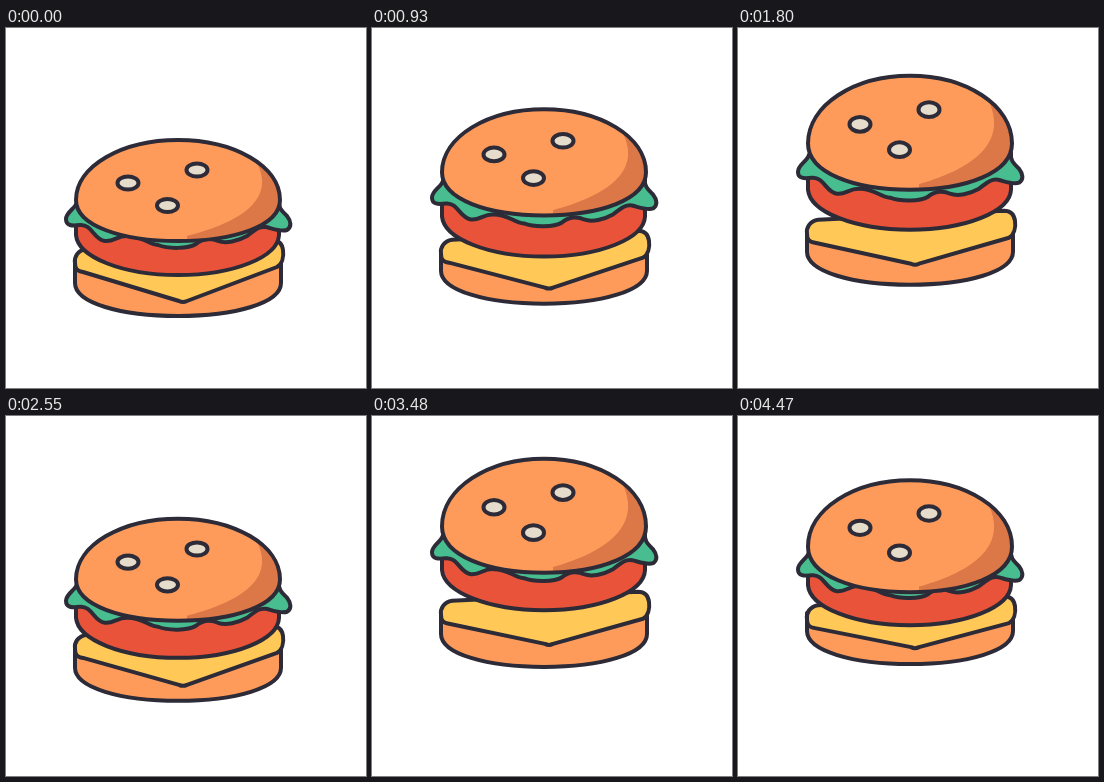
These frames come from a looping animation (360 by 360 pixels, 4500 ms). An HTML page:

```html
<!DOCTYPE html>
<html lang="en">
<head>
<meta charset="utf-8">
<title>Bouncing burger</title>
<style>
html, body { margin: 0; width: 100%; height: 100%; overflow: hidden; background: #fff; }
svg { display: block; width: 100%; height: 100%; }
.line { stroke: #2d2b38; stroke-width: 4; stroke-linejoin: round; stroke-linecap: round; }
#bun * { vector-effect: non-scaling-stroke; }
</style>
</head>
<body>
<svg viewBox="0 0 360 360">
  <path id="base" class="line" fill="#fe9b5b" d="M69 237V255C69 275 115 288 172 288S275 275 275 255V232Z"/>
  <path id="cheese" class="line" fill="#ffc857"/>
  <path id="patty" class="line" fill="#e9533a" d="M70 185V207C72 229 116 247 172 247S272 229 273 207V185Z"/>
  <path id="lettuce" class="line" fill="#48bd90" d="M71 174C70 180 60 184 60 191C60 198 66 198 74 197C86 196 88 212 99 213C108 214 112 207 122 208C136 208 142 216 152 217C162 221 182 221 190 216C197 210 206 210 212 213C220 216 232 213 241 208C248 203 252 198 260 199C268 201 275 204 281 202C286 199 285 193 281 188C276 183 272 180 273 172Z"/>
  <g id="bun">
    <path fill="#fe9b5b" d="M70 172C70 138 116 112 172 112S274 138 274 172C274 198 228 213 172 213S70 198 70 172Z"/>
    <path fill="#dc7748" d="M252 137C266 146 274 158 274 172C274 197 232 213 181 213V208C220 198 271 178 252 137Z"/>
    <path class="line" fill="none" d="M70 172C70 138 116 112 172 112S274 138 274 172C274 198 228 213 172 213S70 198 70 172Z"/>
    <g class="line" fill="#e6dccb">
      <ellipse cx="122" cy="155" rx="10.5" ry="6.5"/>
      <ellipse cx="191" cy="142" rx="10.5" ry="6.5"/>
      <ellipse cx="161.5" cy="177.5" rx="10.5" ry="6.5"/>
    </g>
  </g>
</svg>
<script>
const LOOP = 4500, PERIOD = 825, START = 35;

// Height of each part above its resting place, at these moments of one hop
const times = [0, 40, 70, 115, 160, 220, 310, 412, 505, 550, 620];
const lift = {
  bunTop:    [0, 9, 30, 64, 70, 62, 48, 26, 9, 0, 0],
  bunBottom: [0, 8, 25, 51, 57, 52, 37, 20, 6, 0, 0],
  lettuce:   [0, 6, 21, 47, 56, 52, 38, 16, 3, 0, 0],
  patty:     [0, 5, 18, 45, 54, 52, 38, 10, 0, 2, 0],
  cheeseTip: [0, 4, 13, 37, 47, 50, 42, 10, 0, 0, 0],
  cheese:    [0, 2, 9, 29, 38, 41, 32, 8, 0, 0, 0],
  base:      [0, 3, 12, 31, 39, 45, 40, 10, 0, 0, 0]
};

const slope = (v, i) => (v[i + 1] - v[i]) / (times[i + 1] - times[i]) || 0;

// Monotone tangent: flat at extremes, harmonic mean elsewhere
function tangent(v, i) {
  const a = i ? slope(v, i - 1) : 0, b = slope(v, i);
  return a * b > 0 ? 2 * a * b / (a + b) : 0;
}

function sample(v, phase) {
  const i = times.findIndex((t, k) => phase >= t && phase < times[k + 1]);
  if (i < 0) return 0;
  const h = times[i + 1] - times[i], u = (phase - times[i]) / h, w = 1 - u;
  return v[i] * w * w * (1 + 2 * u) + v[i + 1] * u * u * (3 - 2 * u)
    + h * u * w * (tangent(v, i) * w - tangent(v, i + 1) * u);
}

const el = id => document.getElementById(id);

function draw(now) {
  const phase = (now % LOOP - START + PERIOD) % PERIOD;
  const up = name => sample(lift[name], phase);

  for (const id of ["base", "patty", "lettuce"])
    el(id).setAttribute("transform", `translate(0 ${-up(id)})`);

  const side = up("cheese"), tip = 274 - up("cheeseTip") + side;
  el("cheese").setAttribute("transform", `translate(0 ${-side})`);
  el("cheese").setAttribute("d", `M80 221C72 222 68 229 69 235C69 241 71 243 77 244L173 ${tip - 1}Q177 ${tip + 1} 181 ${tip - 1}L271 239C276 236 278 229 277 222C276 215 272 212 266 212Z`);

  const top = 112 - up("bunTop"), scale = (213 - up("bunBottom") - top) / 101;
  el("bun").setAttribute("transform", `matrix(1 0 0 ${scale} 0 ${top - 112 * scale})`);

  requestAnimationFrame(() => draw(performance.now()));
}
draw(0);
</script>
</body>
</html>
```
